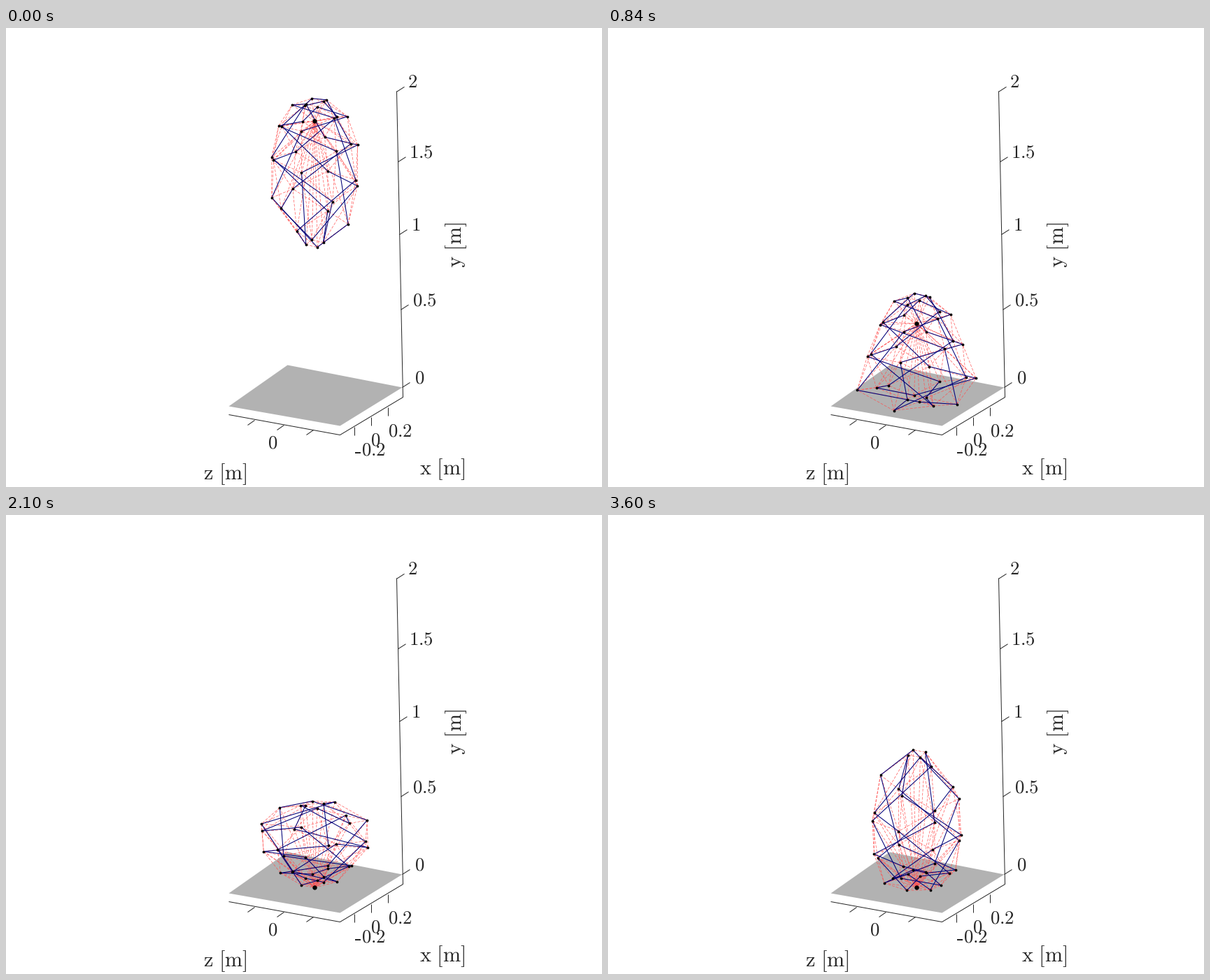
Recreate the animation shown at these times as a matplotlib script. Size 852x657 px, loop 3660 ms.

```python
import numpy as np
import matplotlib.pyplot as plt
from matplotlib.animation import FuncAnimation
from matplotlib.collections import LineCollection

W, H, DPI = 852, 657, 100
FRAMES, STEP = 61, 60
PX = 72 / DPI
INK = "#262626"
CENTER_X = 440.7
FLOOR = 530
LANDING = 480
RINGS = 9

plt.rcParams["mathtext.fontset"] = "cm"

# Rings are counted from the tip that lands first.
n = np.arange(RINGS)
SPAN = 40.5 * n - 3.95 * n * (n - 1) / 2
REST = 487.5 - SPAN
GIRTH = 13.4 + 55 * np.abs(np.sin(np.pi * (n / 8) ** 0.7)) ** 0.65
# After turning inside out, the rounded cap is dimpled upwards at the floor.
SETTLED = FLOOR - np.abs(FLOOR - (341 + 0.97 * SPAN))
FALL_SPEED = 0.374 - 0.0032 * n
BASE_TURN = np.where(n % 2, -28, 17)


def ease(t, start, end):
    u = np.clip((t - start) / (end - start), 0, 1)
    return u * u * (3 - 2 * u)


def bump(t, center, width):
    return np.exp(-((t - center) / width) ** 2)


def fall(t, rest, speed, softness, floor=FLOOR):
    """Steady fall that is cushioned as the height above the floor runs out."""
    drop = floor - rest
    gap = drop - speed * (t - LANDING)
    cushion = softness * drop
    return floor - cushion * np.logaddexp(0, gap / cushion)


def ring_heights(t):
    down = fall(t, REST, FALL_SPEED, 0.32)
    y = down + (SETTLED - down) * ease(t, 1150, 2800)
    return y - 24 * np.sin(np.pi * n / 8) * bump(t, 2000, 400)


def ring_radii(t):
    swell = 0.58 * ease(t, 540, 1080) * (1 - ease(t, 1200, 3000))
    belly = 2 + np.clip((t - 1200) / 1000, 0, 1)
    nearness = 1 - 0.027 * max(0, 1 - t / LANDING)
    return GIRTH * nearness * (1 + swell * bump(n, belly, 1.3))


def points(t):
    """Screen positions of the 36 nodes, then the payload."""
    level = ring_heights(t)[:, None]
    radius = ring_radii(t)[:, None]
    twist = 6 * ease(t, 1800, 2700) - 14 * bump(t, 1550, 480)
    angle = np.radians(BASE_TURN[:, None] + twist + 90 * np.arange(4))
    tilt = 0.36 + (FLOOR - level) * 0.0003
    x = CENTER_X + radius * np.cos(angle)
    y = level - tilt * radius * np.sin(angle)
    nodes = np.column_stack([x.ravel(), y.ravel()])
    return np.vstack([nodes, [CENTER_X, fall(t, 301, 0.35, 0.2, 533)]])


def join(lower, upper, shift):
    """Index pairs linking two rings, shifted by some nodes."""
    return [(4 * lower + j, 4 * upper + (j + shift) % 4) for j in range(4)]


bars = join(0, 1, 1) + join(7, 8, 0)
cables = join(0, 0, 1) + join(8, 8, 1)
for ring in range(RINGS - 1):
    side = -1 if ring % 2 else 1
    cables += join(ring, ring + 1, 0) + join(ring, ring + 1, side)
    if ring < RINGS - 2:
        bars += join(ring, ring + 2, -side)
        cables += join(ring, ring + 2, 0)
cables += [(node, 4 * RINGS) for node in range(4 * RINGS)]
bars, cables = np.array(bars), np.array(cables)

fig = plt.figure(figsize=(W / DPI, H / DPI), dpi=DPI, facecolor="white")
ax = fig.add_axes([0, 0, 1, 1])
ax.set_xlim(-0.5, W - 0.5)
ax.set_ylim(H - 0.5, -0.5)
ax.axis("off")


def line(*xy, width=1):
    ax.plot(xy[::2], xy[1::2], color=INK, lw=width * PX,
            solid_capstyle="butt", zorder=2)


def label(x, y, text, size=19.3, ha="center", **style):
    ax.text(x, y, r"$\mathrm{%s}$" % text, fontsize=size, color=INK,
            ha=ha, va="center", **style)


ax.fill([318, 402, 566, 477], [541, 482, 514, 569], color="#b2b2b2",
        lw=0, zorder=1)
line(318, 553, 477, 582, 567, 528, 558, 90)

for i in range(5):
    x, y = 566 - 2 * i, 514 - 113 * i + 1.8 * i * i
    line(x, y, x + 11, y - 7)
    label(583 - 2.4 * i, y - 13, "%g" % (i / 2), ha="left")
for i in range(3):
    x, y = 497 + 24 * i, 570 - 14 * i
    line(x, y, x, y + 12)
    x, y = 355 + 42 * i, 561 + 7 * i
    line(x, y, x - 10, y + 7)

label(381, 594, "0")
label(562.5, 577, "0.2")
label(527.5, 590, "0")
label(525, 604, "0.2")
line(498, 607, 506, 607, width=2)
label(312.5, 638, r"z\ [m]", 21.8)
label(623.5, 631, r"x\ [m]", 21.8)
label(643.5, 310, r"y\ [m]", 21.8, rotation=90)

red = LineCollection([], colors="#ff5050", linewidths=0.65 * PX,
                     linestyles=[(0, (6, 3))], zorder=3)
blue = LineCollection([], colors="#000078", linewidths=1.05 * PX, zorder=4)
ax.add_collection(red, autolim=False)
ax.add_collection(blue, autolim=False)
dots, = ax.plot([], [], "o", color="black", ms=3.8 * PX, mew=0, zorder=5)
payload, = ax.plot([], [], "o", color="black", ms=6.4 * PX, mew=0, zorder=6)


def update(frame):
    p = points(frame * STEP)
    red.set_segments(p[cables])
    blue.set_segments(p[bars])
    dots.set_data(p[:-1, 0], p[:-1, 1])
    payload.set_data(p[-1:, 0], p[-1:, 1])
    return red, blue, dots, payload


anim = FuncAnimation(fig, update, frames=FRAMES, interval=STEP,
                     repeat=True, repeat_delay=0, blit=False)
plt.show()
```
